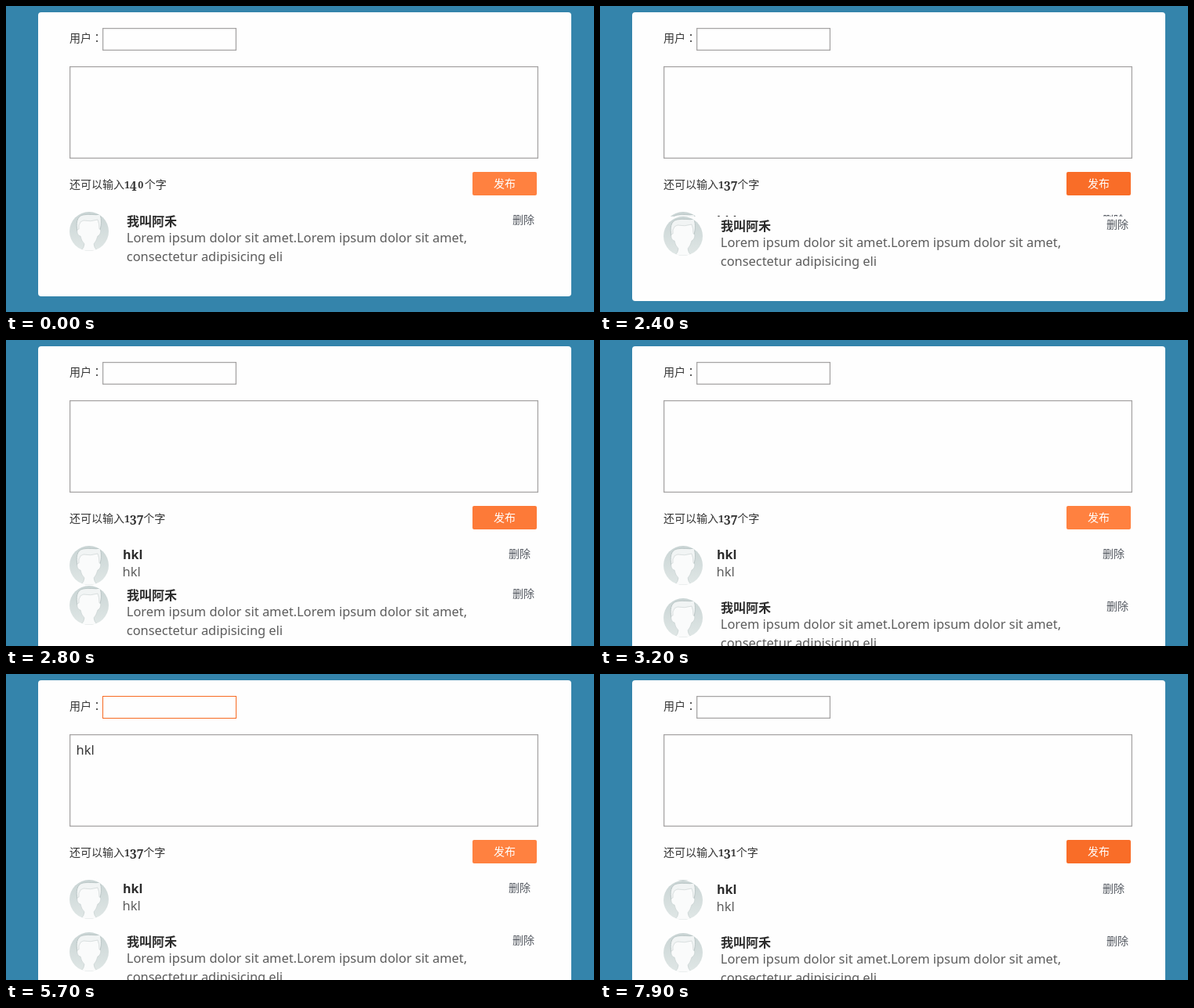
These frames come from a looping animation (750x391 px, 8000 ms). An HTML page:

```html
<!DOCTYPE html>
<html lang="zh-Hans">
<head>
<meta charset="utf-8">
<title>留言板</title>
<style>
html, body { margin: 0; width: 100%; height: 100%; overflow: hidden; background: #3484ab; }
body { position: relative; font: 14px/24px "Noto Sans", "Noto Sans CJK SC", "Noto Sans CJK", sans-serif; color: #333; }
.card { position: absolute; left: 41px; top: 8px; width: 680px; padding-top: 255px; background: #fefefe; border-radius: 4px; }
.abs, .row > * { position: absolute; white-space: pre; }
.colon { font-family: "Noto Sans CJK TC", "Noto Sans CJK", sans-serif; line-height: 0; }
.field { position: absolute; box-sizing: border-box; border: 1px solid #a4a2a2; box-shadow: inset 0 0 2px #b4b2b2; }
.field.focus { border-color: #f76a22; box-shadow: none; }
.caret { position: absolute; width: 1px; background: #222; }
#count b { position: relative; top: 3px; font: 700 15.5px/0 "Noto Serif", serif; }
#count .small { top: 0; font-size: 12.5px; }
#count .round { padding: 0 1.5px; }
#send { left: 595px; top: 212px; width: 82px; height: 30px; border-radius: 2px; line-height: 30px; text-align: center; color: #fff; }
.row { position: relative; height: 0; overflow: hidden; }
.row.first { height: 108px; }
.row svg { left: 40px; top: 0; }
.name { left: 108px; top: -1px; font-size: 16px; font-weight: 700; color: #2b2b2b; }
.text { left: 107.6px; top: 21px; font-size: 16.4px; color: #5c5c5c; }
.del { left: 600px; top: -2px; color: #555a62; }
.first .name { left: 113px; top: 0; }
.first .text { left: 112.8px; }
.first .del { left: 605px; }
</style>
</head>
<body>
<div class="card" id="list"></div>
<div class="abs" style="left:81px;top:29px">用户<span class="colon" lang="zh-Hant">：</span></div>
<div class="field" id="user" style="left:123px;top:28px;width:171px;height:29px"></div>
<div class="abs" style="left:131.6px;top:30px;font-size:14.5px"><span id="userText"></span><i class="caret" id="userCaret" style="top:3px;height:19px"></i></div>
<div class="field" id="note" style="left:81px;top:77px;width:598px;height:118px"></div>
<div class="abs" style="left:89.6px;top:85px;font-size:16.4px"><span id="noteText"></span><i class="caret" id="noteCaret" style="top:1px;height:21px"></i></div>
<div class="abs" style="left:81px;top:216px">还可以输入<span id="count"></span>个字</div>
<div class="abs" id="send">发布</div>
<script>
const LOOP = 8000, KEYS = 'hkl', LIMIT = 140, ROW = 67, BLINK = 480;
const $ = id => document.getElementById(id);
const clamp = x => Math.min(1, Math.max(0, x));

const avatar = `<svg width="50" height="50" viewBox="0 0 50 50">
<defs><linearGradient id="sky" x2="0" y2="1"><stop stop-color="#c9d4d4"/><stop offset="1" stop-color="#e0e7e6"/></linearGradient>
<clipPath id="disc"><circle cx="25" cy="25" r="25"/></clipPath></defs>
<g clip-path="url(#disc)" stroke="#b6c2c2" stroke-width=".9"><path fill="url(#sky)" stroke="none" d="M0 0h50v50H0z"/>
<path fill="#f1f4f4" d="M10 25C8 15 9 6 17 4C25 2 33 5 39 3C41 10 41 18 38 26Z"/>
<path fill="#fafbfb" stroke-opacity=".5" d="M12 17Q14 11 18 11Q27 13 36 10Q38 15 38 22Q41 22 39 28Q37 31 36 31Q34 38 31 41Q31 46 36 50H14Q19 46 19 41Q15 37 14 31Q11 31 10 27Q9 22 12 22Z"/></g></svg>`;

const row = (name, text, cls = '') => `<div class="row ${cls}">${avatar}
<div class="name">${name}</div><div class="text">${text}</div><div class="del">删除</div></div>`;

const lorem = 'Lorem ipsum dolor sit amet.';
$('list').innerHTML = row(KEYS, KEYS.repeat(3)) + row(KEYS, KEYS) +
  row('我叫阿禾', `${lorem}${lorem.slice(0, -1)},<br>consectetur adipisicing eli`, 'first');
const [newer, newItem] = document.querySelectorAll('.row');

// The visitor's session: clicks, bursts of keys, and posts that clear the form.
const clicks = [
  { at: 600, field: 'user' }, { at: 1300, field: 'note' }, { at: 3500, field: 'note' },
  { at: 5100, field: 'user' }, { at: 6800, field: 'note' }
];
const burst = (field, start, gap, n = 3) =>
  Array.from({ length: n }, (_, i) => ({ field, at: start + i * gap }));
const keys = [
  ...burst('user', 900, 100), ...burst('note', 1640, 60), ...burst('note', 3640, 90),
  ...burst('user', 6340, 60), ...burst('note', 6950, 90, 6)
];
const posts = [2300, 7900];

const lastPost = t => posts.findLast(p => p <= t) ?? 0;
const since = (events, t) => events.filter(e => e.at <= t && e.at >= lastPost(t));
const typed = (field, t) => since(keys, t).filter(k => k.field === field).length;

// jQuery-like swing of a new row's height, starting just before the form clears.
const slide = (t, post) => Math.round(ROW * (0.5 - Math.cos(Math.PI * clamp((t - post + 60) / 830)) / 2));

// The pressed button darkens, holds, then fades back.
function buttonColor(t) {
  const age = t - lastPost(t);
  const dark = lastPost(t) ? clamp((600 - age) / 300) : 0;
  return `rgb(${255 - 6 * dark}, ${129 - 20 * dark}, ${64 - 24 * dark})`;
}

// Old-style figures: 0 to 2 are small, the others hang below the line.
const figures = n => [...String(n)].map(d =>
  `<b class="${d < 3 ? 'small' : ''} ${d === '0' ? 'round' : ''}">${d}</b>`).join('');

let shown;
function draw(t) {
  const focus = since(clicks, t).at(-1)?.field;
  const active = Math.max(...since([...clicks, ...keys], t).map(e => e.at));
  const caretOn = (t - active) % (2 * BLINK) <= BLINK - 1;
  for (const id of ['user', 'note']) {
    $(id).classList.toggle('focus', focus === id);
    $(id + 'Text').textContent = KEYS.repeat(3).slice(0, typed(id, t));
    $(id + 'Caret').style.visibility = focus === id && caretOn ? 'visible' : 'hidden';
  }
  // The counter keeps its last value until the next key.
  const left = LIMIT - (typed('note', t) || typed('note', lastPost(t) - 1));
  if (left !== shown) $('count').innerHTML = figures(shown = left);
  $('send').style.background = buttonColor(t);
  newItem.style.height = slide(t, posts[0]) + 'px';
  newer.style.height = slide(t, posts[1]) + 'px';
}

// The picture advances in steps of a tenth of a second.
const begin = performance.now();
function tick() {
  const t = (performance.now() - begin) % LOOP;
  draw(Math.floor(t / 100) * 100);
  requestAnimationFrame(tick);
}
tick();
</script>
</body>
</html>
```
